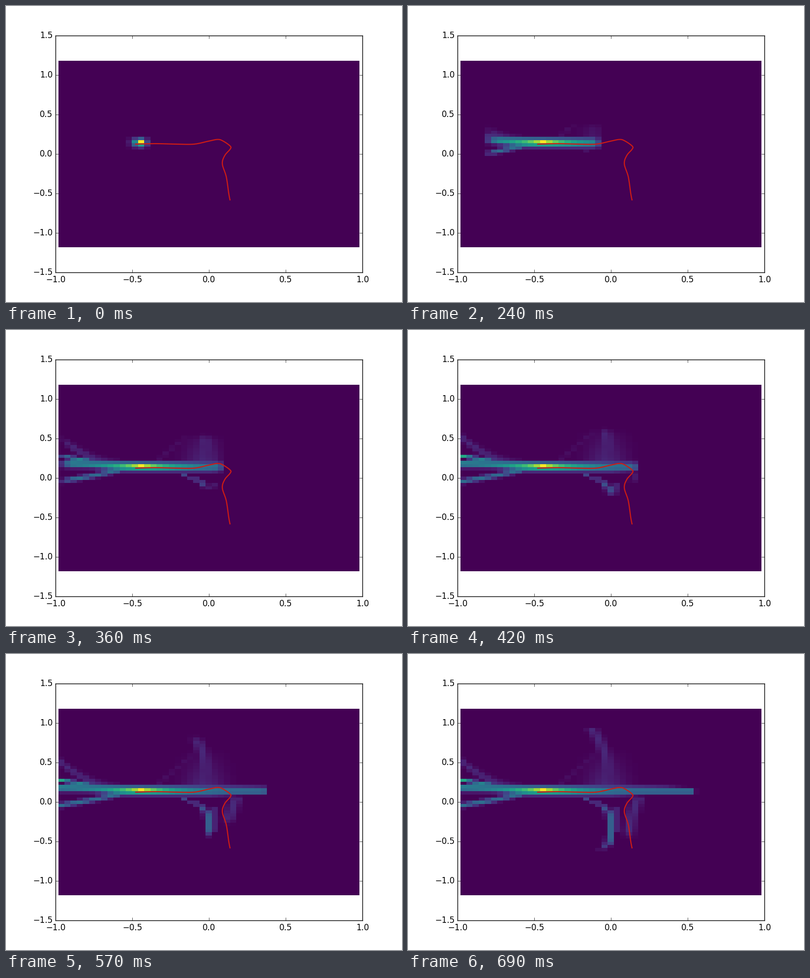
Write a matplotlib script that moves like this. It is 800 by 600 pixels and loops after 0.72 s.

```python
import numpy as np
import matplotlib.pyplot as plt
from matplotlib.animation import FuncAnimation

FRAMES, INTERVAL = 24, 30
CELL = 0.04
NX, NY = 24, 29      # cells on each side of the centre
START = -11          # column where the walk begins

plt.style.use("classic")
plt.rcParams["font.sans-serif"] = ["DejaVu Sans"]
plt.rcParams["savefig.facecolor"] = "white"

I, J = np.meshgrid(np.arange(-NX, NX + 1), np.arange(-NY, NY + 1))


def bell(offset, width):
    """Gaussian falloff, cut to zero at its faint end."""
    b = np.exp(-(offset / width) ** 2)
    return np.where(b < 0.08, 0, b)


def core():
    """The bright horizontal band, four rows high."""
    hill = np.exp(-((I - START) / 8) ** 2)
    peak = np.exp(-np.abs(I - START) / 2)
    from_left = 1 / (1 + np.exp(-(I + 16.5)))
    return np.select(
        [J == 5, J == 4, J == 3, J == 2],
        [(0.18 - 0.01 * I) * np.clip((13 - I) / 4, 0, 1),
         0.33 + 0.32 * hill + 0.35 * peak,
         0.06 + (0.24 + 0.26 * hill) * from_left,
         0.12 * from_left * np.clip((6 - I) / 6, 0, 1)])


def fan():
    """Three strands that part towards the left edge."""
    s = np.clip((-14 - I) / 10, 0, 1)
    high = 0.11 * bell(J - (4.5 + 8 * s ** 2), 1.2)
    middle = (0.36 + 0.24 * s ** 3) * bell(J - (4 + 3 * s ** 1.1), 0.6)
    low = 0.36 * bell(J - (3 - 3.9 * s ** 0.8), 0.75)
    return np.where(s > 0, np.maximum.reduce([high, middle, low]), 0)


def plume(center, low, high, level, width):
    """Upright strand whose column depends on the row."""
    return np.where((J >= low) & (J <= high), level * bell(I - center, width), 0)


def haze():
    """Faint cloud above the middle with a slanted left rim."""
    cloud = 0.1 * np.exp(-((I + 0.7) / 3.2) ** 2) * np.clip((17 - J) / 12, 0, 1)
    rim = 0.035 * bell(J - (19.3 + 1.65 * I), 0.9) * ((I >= -8) & (I <= -2))
    return np.where(J > 5, np.maximum(cloud, rim), 0)


FULL = np.maximum.reduce([
    core(), fan(), haze(),
    plume(-0.5 - 2.5 * ((J - 10) / 13) ** 2, 6, 23, 0.11, 0.9),
    plume(-4 * ((J + 8) / 9) ** 4, -15, 1, 0.3 - 0.025 * np.clip(J + 3, 0, 4), 0.6),
    plume(1, -9, -2, 0.09, 0.6),
    plume(3 + 1.5 * ((J + 11) / 12) ** 2, -11, 1, 0.12, 0.9),
])


def spread(t):
    """Part of the full map that has been reached at step t."""
    right = np.clip(1.035 * t - 9.75 - I, 0, 1)
    left = np.clip((I + 13.2 + 0.96 * t) / 2.2, 0, 1)
    up = np.where(J > 5, np.clip((t + 2.2 - J) / 2, 0, 1), 1)
    tip = np.where(I >= 2, 13, 9) - 1.07 * t
    down = np.where((J < 2) & (I > -9), np.clip((J - tip) / 2.5, 0, 1), 1)
    return FULL * right * left * up * down


def edges(n, center, scale):
    """Cell edges on whole pixels, returned in data units."""
    px = np.floor(center + (np.arange(2 * n + 2) - n - 0.5) * CELL * scale - 1e-6)
    px[-1] += 1
    return (px - center) / scale


def smooth(points, steps=6):
    """Catmull-Rom curve through a few points."""
    p = np.array([points[0], *points, points[-1]], float)
    u = np.linspace(0, 1, steps, endpoint=False)[:, None]
    parts = [0.5 * (2 * b + (c - a) * u + (2 * a - 5 * b + 4 * c - d) * u ** 2
                    + (3 * b - a - 3 * c + d) * u ** 3)
             for a, b, c, d in zip(p, p[1:], p[2:], p[3:])]
    return np.vstack(parts + [p[-1:]])


fig = plt.figure(figsize=(8, 6), dpi=100, facecolor="white")
ax = fig.add_axes([0.125, 0.1, 0.775, 0.8])
mesh = ax.pcolormesh(edges(NX, 410, 310), edges(NY, 300, 160), spread(0),
                     cmap="viridis", vmin=0, vmax=1)

# walked path, in stage pixels
walk = smooth([(262, 280), (302, 279), (345, 280), (380, 280), (409, 274), (428, 270.5),
               (439, 274), (453, 284), (453, 290), (442, 303), (437, 320), (445, 346),
               (450, 380), (452.5, 393)])
ax.plot((walk[:, 0] - 410) / 310, (300 - walk[:, 1]) / 160, color="#cf1c14", lw=1.6)

ax.set_xlim(-1, 1)
ax.set_ylim(-1.5, 1.5)
ax.set_xticks(np.arange(-1, 1.1, 0.5))
ax.set_yticks(np.arange(-1.5, 1.6, 0.5))


def update(t):
    mesh.set_array(spread(t))
    return (mesh,)


anim = FuncAnimation(fig, update, frames=FRAMES, interval=INTERVAL,
                     repeat=True, repeat_delay=0, blit=False)
plt.show()
```
